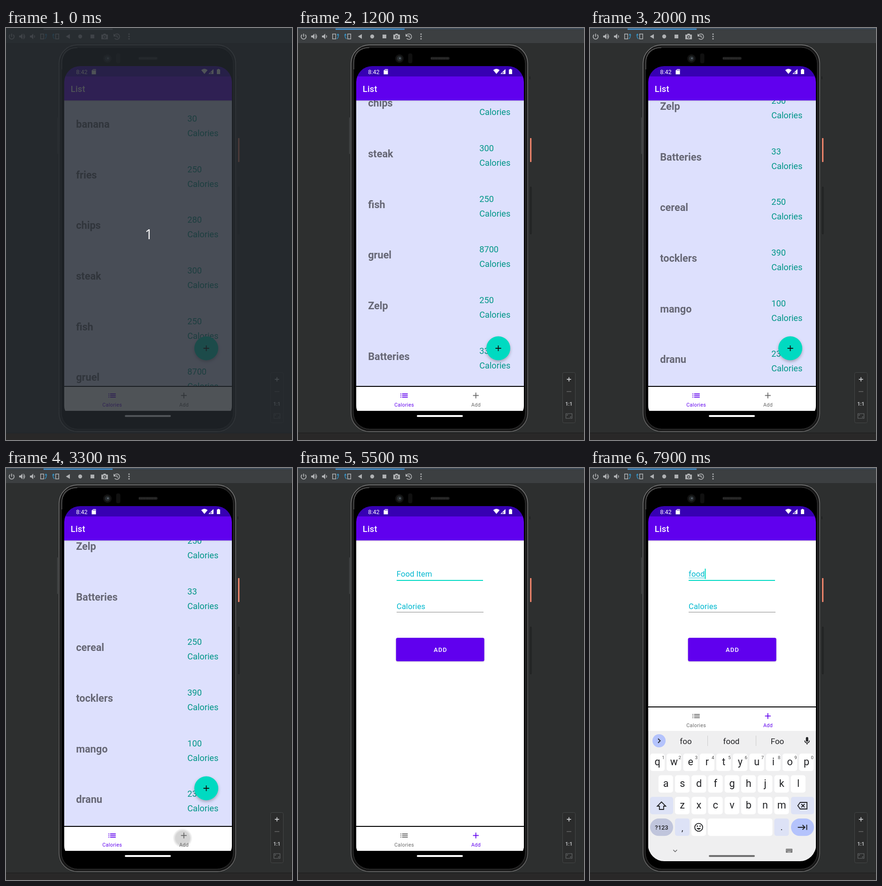
An HTML page that plays this animation: 609x876 px, repeating every 8000 ms.

```html
<!DOCTYPE html>
<html lang="en">
<head>
<meta charset="utf-8">
<title>Calorie list</title>
<style>
  html, body { margin: 0; width: 100%; height: 100%; overflow: hidden; background: #2d2f2f; }
  svg { display: block; width: 609px; height: 876px; font-family: Roboto, sans-serif; }
  text { white-space: pre; }
</style>
</head>
<body>
<svg id="stage" viewBox="0 0 609 876" xmlns="http://www.w3.org/2000/svg"></svg>
<script>
const PURPLE = '#6000ee', TEAL = '#03dac5', GREY = '#afb1b3', INK = '#202124', HINT = '#00b8cf';

const rect = (x, y, w, h, fill, rx = 0, more = '') =>
  `<rect x="${x}" y="${y}" width="${w}" height="${h}" rx="${rx}" fill="${fill}" ${more}/>`;
const disc = (x, y, r, fill, more = '') => `<circle cx="${x}" cy="${y}" r="${r}" fill="${fill}" ${more}/>`;
const text = (x, y, s, size, fill, more = '') =>
  `<text x="${x}" y="${y}" font-size="${size}" fill="${fill}" ${more}>${s}</text>`;
const line = (x, y, d, color, w = 1.6, more = '') =>
  `<path transform="translate(${x} ${y})" d="${d}" fill="none" stroke="${color}" stroke-width="${w}" ${more}/>`;
const shape = (x, y, d, fill, more = '') =>
  `<path transform="translate(${x} ${y})" d="${d}" fill="${fill}" ${more}/>`;
const group = (id, body, more = '') => `<g id="${id}" ${more}>${body}</g>`;
const MID = 'text-anchor="middle"';
const plus = r => `M${-r} 0H${r}M0 ${-r}V${r}`;

function toolbar() {
  const speaker = x => shape(x, 18, 'M-5 -2h3l4 -4v12l-4 -4h-3z', GREY);
  const turn = (x, s) => `<g transform="translate(${x} 18) scale(${s} 1)">`
    + line(0, 0, 'M-6.3 -5.3h6.6v10.6h-6.6z', GREY, 1.5)
    + line(0, 0, 'M2.5 5Q6.5 3 5.5 -3', '#3592c4', 1.6)
    + shape(0, 0, 'M2.5 -2.5L5 -6.5L8 -2.5z', '#3592c4') + '</g>';
  return rect(0, 0, 609, 32, '#3c3f41') + rect(0, 0, 609, 3, '#3c3f41', 0, 'id="strip"')
    + rect(0, 3, 609, 1, '#323536') + rect(80, 1, 147, 3, '#747a80', 0, 'id="tab"')
    + line(12, 18.5, 'M-3.4 -4.2A5.3 5.3 0 1 0 3.4 -4.2M0 -6.5V0', GREY, 1.8)
    + speaker(33) + line(35, 18, 'M2 -2.5Q4 0 2 2.5M2 -5.5Q8 0 2 5.5', GREY, 1.4)
    + speaker(56) + line(57, 18, 'M3 -2.5Q5 0 3 2.5', GREY, 1.4)
    + turn(80, 1) + turn(106, -1)
    + shape(132, 18, 'M-4.5 0L4 -5V5z', GREY) + disc(158, 18, 4.2, GREY) + rect(180, 14, 8, 8, GREY)
    + shape(210, 18, 'M-7 -4h3.5l1.5 -2h4l1.5 2H7V6H-7z', GREY)
    + disc(210, 19, 3.3, '#3c3f41') + disc(210, 19, 1.8, GREY)
    + line(236, 18, 'M-5 -2.5A5.8 5.8 0 1 1 -4.5 4M0 -3V.5L3 2', GREY, 1.6)
    + shape(236, 18, 'M-7 -6V0H-1z', GREY)
    + [13, 18, 23].map(y => disc(262, y, 1.6, GREY)).join('');
}

function zoomBox() {
  return rect(563.5, 732.5, 27, 107, '#2b2c2c', 3, 'stroke="#444747"')
    + line(577, 747, plus(4.5), '#c0c2c4', 1.8) + line(577, 773, 'M-5 0H5', '#666', 1.5)
    + text(576.7, 802.7, '1:1', 10.5, '#c0c2c4', MID + ' font-weight="700"')
    + line(577, 825, 'M-6.5 -5h13v10h-13zM-4 -.5V-2.5H-2M4 .5V2.5H2', '#6a6d6e', 1.1);
}

function phone() {
  return rect(109, 190, 1.5, 78, '#4a4d4e', 1) + rect(494, 234, 3.2, 51, '#e9826a', 1)
    + rect(494.5, 338, 2.5, 100, '#2a2b2b', 1, 'stroke="#161717" stroke-width=".8"') + rect(493, 103, 1.5, 6, '#1b1c1c')
    + rect(113, 36, 376, 822, '#121212', 39, 'stroke="url(#metal)" stroke-width="1.4"')
    + rect(115.3, 38.5, 371.4, 817, '#141414', 37, 'stroke="#222"')
    + rect(117.8, 41, 366.4, 812, '#000', 35, 'stroke="#454545" stroke-width="1"')
    + line(0, 0, 'M119 88V74Q119 42 152 42', '#999', 1.2, 'opacity=".6"')
    + disc(216, 65, 9, '#121212') + disc(216, 65, 5.5, '#252a2d') + disc(217, 64.5, 2, '#59636c')
    + rect(234.5, 54, 9, 21, '#101010', 4)
    + rect(282, 61.5, 41, 6, '#1c1c1c', 3)
    + line(284, 64.5, 'M0 0H37', '#303030', 4, 'stroke-dasharray="2 1.4"');
}

function bars() {
  return rect(124, 81, 357, 22, '#3700b3') + rect(124, 103, 357, 51, PURPLE)
    + rect(124, 154, 357, 3, 'url(#drop)')
    + text(149.3, 97.5, '8:42', 12.6, '#fff')
    + shape(187, 93, 'M-1.5 -5.5H4.5V5.5H-4.5V-2.5z', '#fff')
    + line(187, 93, 'M-1.3 -4.5V-2M.8 -4.5V-2M2.9 -4.5V-2', '#3700b3', .9)
    + shape(422.5, 92.5, 'M-6.8 -3Q0 -8.5 6.8 -3L0 5.3z', '#fff')
    + line(436.5, 92.5, 'M-4 4.6H4.6V-4z', '#fff', 1.1) + shape(436.5, 92.5, 'M1 5V0L5 -4V5z', '#fff')
    + shape(452.5, 92.5, 'M-1.5 -5.5h3v1.2h2V5.5h-7V-4.3h2z', '#fff')
    + text(137.8, 136, 'List', 18.2, '#fff', 'font-weight="500" letter-spacing=".23"');
}

const foods = [['banana', 30], ['fries', 250], ['chips', 280], ['steak', 300], ['fish', 250], ['gruel', 8700],
  ['Zelp', 250], ['Batteries', 33], ['cereal', 250], ['tocklers', 390], ['mango', 100], ['dranu', 230]];

function list() {
  const rows = foods.map(([name, cal], i) => {
    const y = 212 + 107.67 * i;
    return text(149.2, y, name, 21.7, '#666775', 'font-weight="700"')
      + text(386.2, y - 13, cal, 18.2, '#009688') + text(386.2, y + 18, 'Calories', 18.2, '#009688');
  }).join('');
  return rect(124, 154, 357, 660, '#dde0fd') + group('rows', rows)
    + disc(426.5, 681, 25.5, '#00dac1', 'style="filter:drop-shadow(0 3px 3px rgba(0,0,0,.28))"')
    + line(426.5, 681, plus(6.1), '#111', 1.8);
}

function form() {
  const hint = 'letter-spacing=".15"';
  return rect(124, 154, 357, 660, '#fff')
    + text(210, 231.4, 'Food Item', 16.5, HINT, 'id="food" ' + hint)
    + rect(210, 238, 184, 1, '#757575', 0, 'id="rule"')
    + rect(210, 233.4, 0, .9, HINT, 0, 'id="compose"') + rect(210, 214, 2, 22, TEAL, 0, 'id="caret"')
    + text(210, 300, 'Calories', 16.5, HINT, hint) + rect(210, 306, 185, 1, '#858585')
    + rect(208.7, 361, 188, 50, PURPLE, 3.5, 'style="filter:drop-shadow(0 1px 1px rgba(0,0,0,.2))"')
    + text(303.5, 391.2, 'ADD', 13, '#fff', MID + ' font-weight="500" letter-spacing="1.1"');
}

function nav() {
  const label = 'text-anchor="middle" letter-spacing=".45"';
  return rect(124, 761, 357, 2, '#000') + rect(124, 763, 357, 51, '#fff')
    + '<g clip-path="url(#navClip)"><circle id="ripple" fill="url(#soft)"/></g>'
    + group('tabList', line(225.9, 781.4, 'M-4.3 -3.5H7.8M-4.3 0H7.8M-4.3 3.5H7.8M-7.8 -3.5h1.7M-7.8 0h1.7M-7.8 3.5h1.7', 'currentColor', 1.74)
      + text(226.2, 805, 'Calories', 10.6, 'currentColor', label))
    + group('tabAdd', line(378.7, 781.4, plus(6.1), 'currentColor', 1.74)
      + text(379, 805, 'Add', 10.6, 'currentColor', label));
}

function keyboard() {
  const key = (x, y, w = 31, fill = '#fff', rx = 5) => rect(x, y, w, 37, fill, rx);
  const letter = (c, x, y) => key(x, y) + text(x + 15.7, y + 25, c, 21.5, INK, MID);
  const row = (s, x, y) => [...s].map((c, i) => letter(c, x + 35.25 * i, y)).join('');
  const digits = [...'1234567890'].map((c, i) => text(156 + 35.25 * i, 619, c, 9.5, '#444', MID)).join('');
  const tools = line(194, 580, 'M3 7H-5Q-7 7 -7 5V-5Q-7 -7 -5 -7H5Q7 -7 7 -5V2zL3 3V2H7M-3.5 1Q0 5 3 1.5M-3 -3V-1.5M3 -3V-1.5', INK, 1.6)
    + text(245, 584.8, 'GIF', 12.6, INK, MID + ' font-weight="900" letter-spacing=".8"')
    + line(296, 580.5, 'M-3 -6.5H-6.5V7.5H6.5V-6.5H3M-3 -1.5H3.5M-3 1.5H3.5M-3 4.5H1.5', INK, 1.6)
    + rect(292.5, 572, 7, 4, INK, 1)
    + disc(347.5, 580, 4.3, 'none', `stroke="${INK}" stroke-width="3.6"`)
    + disc(347.5, 580, 6.6, 'none', `stroke="${INK}" stroke-width="2.6" stroke-dasharray="3.6 3.31"`)
    + rect(379, 569, 1, 22, '#ccc') + [406, 411, 416].map(x => disc(x, 580, 1.6, INK)).join('');
  const words = [204, 301, 399].map(x => text(x, 586.5, '', 17, INK, MID + ' class="word"')).join('')
    + rect(250, 569, 1, 22, '#ccc') + rect(353, 569, 1, 22, '#ccc');
  const foot = line(181.3, 814, 'M-4 -2L0 2L4 -2', '#666', 1.5)
    + rect(417, 809.5, 14, 8.5, '#777', 1)
    + line(418, 811.7, 'M0 0H12M0 2.3H12', '#efeff0', 1, 'stroke-dasharray="1 1.4"') + rect(420.5, 815.8, 7, 1, '#efeff0')
    + rect(253, 823, 98, 4, '#707070', 2);
  return rect(124, 559, 357, 300, '#efeff0')
    + disc(147, 580, 14, '#b4c3fc') + line(147, 580, 'M2.5 -4.5L-2 0L2.5 4.5', INK, 1.8, 'id="chevron"')
    + group('tools', tools) + group('words', words)
    + rect(459.7, 572, 5, 10, INK, 2.5) + line(462.2, 580, 'M-5 -.5A5 5 0 0 0 5 -.5M0 4.5V8', INK, 1.7)
    + row('qwertyuiop', 128, 607.3) + digits + row('asdfghjkl', 145.8, 653.3) + row('zxcvbnm', 181, 699.3)
    + key(128, 699.3, 49, '#dde2f6') + line(152.3, 718, 'M0 -8L-9 1H-4.5V8H4.5V1H9z', INK, 1.8)
    + key(428, 699.3, 49, '#dde2f6')
    + line(452.5, 718, 'M-10 0L-5 -7H9.5V7H-5zM-2.5 -3.5L4.5 3.5M4.5 -3.5L-2.5 3.5', INK, 1.8)
    + key(128, 745.3, 49, '#c0c5dc', 18.5) + text(152.5, 769.3, '?123', 12.9, INK, MID + ' font-weight="500"')
    + key(181, 745.3, 31, '#dde2f6') + text(196.5, 772, ',', 19, INK, MID)
    + key(216, 745.3) + disc(231.5, 764, 8.4, 'none', `stroke="${INK}" stroke-width="1.8"`)
    + disc(228.6, 761.5, 1.4, INK) + disc(234.4, 761.5, 1.4, INK) + shape(231.5, 764, 'M-4.8 1.5H4.8Q0 8.5 -4.8 1.5', INK)
    + key(251, 745.3, 137.5) + key(392.5, 745.3, 31, '#dde2f6') + text(408, 770, '.', 19, INK, MID)
    + key(428, 745.3, 49, '#b4c3fc', 18.5)
    + line(452.5, 764, 'M-10 0H5M0 -5L5 0L0 5M9 -5.5V5.5', INK, 1.9)
    + group('foot', foot);
}

const stage = document.getElementById('stage');
stage.innerHTML = `<defs>
  <linearGradient id="metal" x2="0" y2="1"><stop stop-color="#808080"/><stop offset=".5" stop-color="#5c5c5c"/><stop offset="1" stop-color="#707070"/></linearGradient>
  <linearGradient id="drop" x2="0" y2="1"><stop stop-opacity=".14"/><stop offset="1" stop-opacity="0"/></linearGradient>
  <radialGradient id="soft"><stop offset=".7" stop-opacity=".17"/><stop offset="1" stop-opacity="0"/></radialGradient>
  <clipPath id="screen"><rect x="124" y="81" width="357" height="755" rx="34"/></clipPath>
  <clipPath id="page"><rect x="124" y="154" width="357" height="608"/></clipPath>
  <clipPath id="navClip"><rect x="124" y="763" width="357" height="51"/></clipPath></defs>`
  + rect(0, 0, 609, 876, '#2d2f2f') + rect(0, 860, 609, 2, '#222323') + rect(0, 862, 609, 14, '#292828')
  + rect(608, 32, 1, 828, '#252626') + toolbar() + zoomBox() + phone()
  + '<g clip-path="url(#screen)">' + rect(124, 81, 357, 755, '#000') + rect(124, 154, 357, 660, '#fff')
  + group('list', list(), 'clip-path="url(#page)"') + group('form', form()) + group('nav', nav())
  + rect(124, 814, 357, 22, '#000') + rect(253, 823, 98, 4, '#fff', 2)
  + group('keys', keyboard()) + bars() + '</g>'
  + group('count', rect(0, 0, 609, 862, 'rgba(36,41,46,.8)')
    + text(304, 449, '1', 29, '#fff', MID + ' font-family="Open Sans, sans-serif"'));

const el = {};
stage.querySelectorAll('[id]').forEach(e => el[e.id] = e);
const wordEls = stage.querySelectorAll('.word');
const set = (e, attrs) => { for (const k in attrs) e.setAttribute(k, attrs[k]); };
const show = (e, on) => set(e, { opacity: +on });

// Value of the last [time, value] step reached.
const at = (steps, t) => steps.reduce((v, [time, next]) => t >= time ? next : v, steps[0][1]);

const scroll = [[0, 0], [1100, 80], [1200, 260], [1300, 446], [1400, 555], [1500, 615],
  [1600, 648], [1700, 666], [1800, 676], [1900, 682], [2000, 684]];
const formFade = [[0, 0], [3500, .25], [3600, .7], [3700, 1]];
const slide = [[0, 300], [6200, 170], [6300, 18], [6400, 1.6], [6500, 0]];
const caretOn = [[0, 0], [5700, 1], [6200, 0], [6700, 1], [7200, 0], [7400, 1]];
const typed = [[0, ''], [7400, 'f'], [7600, 'fo'], [7700, 'foo'], [7900, 'food']];
const hints = [[0, ''], [7500, 'f for from'], [7700, 'fo for food'], [7800, 'foo food Foo']];
const clamp = v => Math.max(0, Math.min(1, v));

function render(t) {
  show(el.count, t < 100);
  set(el.tab, { fill: t < 800 ? '#747a80' : '#4088c2' });
  set(el.strip, { fill: t < 800 ? '#3c3f41' : '#3d4955' });

  set(el.rows, { transform: `translate(0 ${-at(scroll, t)})` });
  show(el.list, t < 3700);
  show(el.form, at(formFade, t));

  const grow = clamp((t - 3300) / 300);
  set(el.ripple, { cx: 376 + 3 * grow, cy: 787, r: 21 + 50 * grow,
    opacity: t < 3300 ? 0 : 1 - clamp((t - 3500) / 500) });
  const adding = t >= 3500;
  el.tabList.style.color = adding ? '#666' : PURPLE;
  el.tabAdd.style.color = adding ? PURPLE : '#666';

  const focus = t >= 5500;
  set(el.rule, { height: focus ? 2 : 1, fill: focus ? TEAL : '#757575' });
  set(el.nav, { transform: `translate(0 ${t >= 6300 ? -254 : 0})` });
  show(el.keys, t >= 6200);
  set(el.keys, { transform: `translate(0 ${at(slide, t)})` });
  set(el.foot, { opacity: .08 + .92 * clamp((t - 6400) / 800) });

  const word = at(typed, t), words = at(hints, t).split(' ');
  el.food.textContent = word || 'Food Item';
  const width = word ? el.food.getComputedTextLength() : 0;
  set(el.caret, { x: 210 + width, opacity: at(caretOn, t) });
  set(el.compose, { width });
  show(el.tools, words.length < 3);
  show(el.words, words.length === 3);
  wordEls.forEach((e, i) => e.textContent = words[i] || '');
  set(el.chevron, { d: words.length < 3 ? 'M2.5 -4.5L-2 0L2.5 4.5' : 'M-2 -4.5L2.5 0L-2 4.5' });
}

const start = performance.now();
function tick() {
  const t = (performance.now() - start) % 8000;
  render(Math.floor(t / 100) * 100);
  requestAnimationFrame(tick);
}
tick();
</script>
</body>
</html>
```
